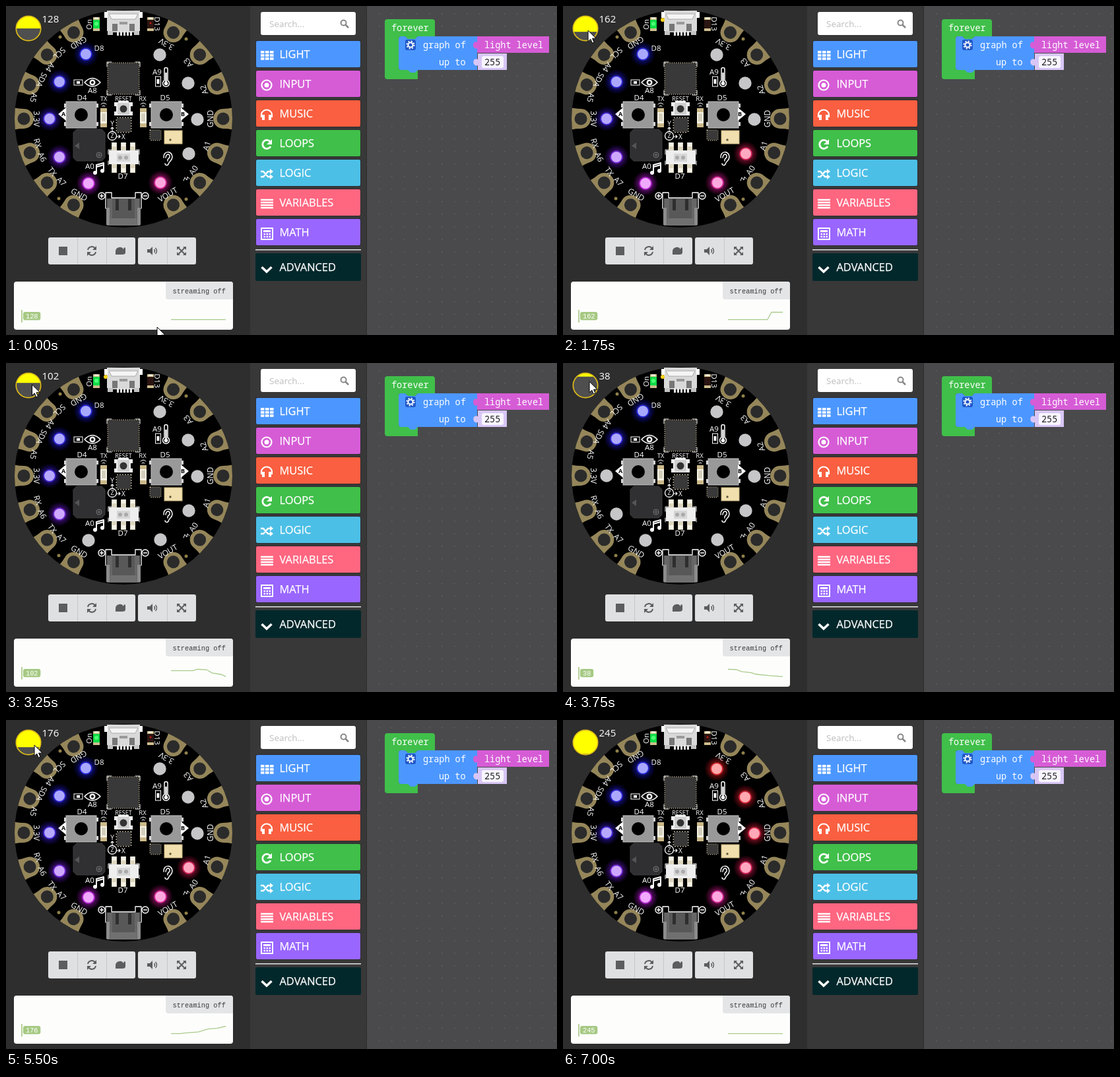
Recreate the animation shown at these times as an HTML page. Size 835 by 499 pixels, loop 7250 ms.

```html
<!DOCTYPE html>
<html lang="en">
<head>
<meta charset="utf-8">
<title>Light level graph</title>
<style>
html, body { margin: 0; width: 100%; height: 100%; overflow: hidden; background: #2e2e2e; }
svg { display: block; font-family: "Open Sans", "Noto Sans", sans-serif; }
.board text { fill: #fff; font-size: 11.5px; text-anchor: middle; }
.line { fill: none; stroke: #fff; stroke-width: 1.5; stroke-linecap: round; stroke-linejoin: round; }
.menu text { fill: #fff; stroke: #fff; stroke-width: .25px; font-size: 16.4px; }
.code { font: 13.5px "Noto Sans Mono", "DejaVu Sans Mono", monospace; fill: #fff; }
.mono { font: 10.3px "Liberation Mono", monospace; }
</style>
</head>
<body>
<svg id="stage" width="835" height="499" viewBox="0 0 835 499">
  <defs>
    <clipPath id="disc"><circle cx="178" cy="171" r="165"/></clipPath>
    <clipPath id="sun"><circle cx="34" cy="34" r="18.5"/></clipPath>
    <pattern id="dots" x="556" y="2" width="19" height="19" patternUnits="userSpaceOnUse">
      <rect x="9" y="9" width="1.4" height="1.4" fill="#666668"/>
    </pattern>
  </defs>
  <rect width="370" height="499" fill="#2e2e2e"/>
  <rect x="370" width="177" height="499" fill="#383839"/>
  <rect x="547" width="288" height="499" fill="#4a4a4c"/>
  <rect x="547" width="288" height="499" fill="url(#dots)"/>
  <path d="M546.5 0V499" stroke="#2c2c2c"/>

  <g id="board" class="board"></g>
  <g id="leds"></g>

  <circle cx="34" cy="34" r="18.5" fill="#4f4f4f"/>
  <rect id="level" x="15" y="15" width="38" height="0" fill="#ff0" clip-path="url(#sun)"/>
  <circle cx="34" cy="34" r="18.7" fill="none" stroke="#dfbd18" stroke-width="1.7"/>
  <text id="reading" x="54.5" y="25" fill="#fff" font-size="15"></text>

  <g id="tools"></g>

  <rect x="12" y="418" width="332" height="73" rx="4" fill="#fdfefc"/>
  <path d="M242 418H340a4 4 0 0 1 4 4V445H246a4 4 0 0 1-4-4Z" fill="#e4e5e7"/>
  <text class="mono" x="252.5" y="436" fill="#3a3a3a">streaming off</text>
  <path d="M24 461V480" stroke="#a3c67f" stroke-width="1.6"/>
  <rect id="tag" x="26" y="464" width="26" height="12.5" rx="3" fill="#a6c983"/>
  <text id="tagText" class="mono" x="30" y="473.5" fill="#fff"></text>
  <path id="plot" fill="none" stroke="#a9ca8b" stroke-width="1.3"/>

  <g id="menu" class="menu"></g>

  <g>
    <path d="M574 24a4 4 0 0 1 4-4H646a4 4 0 0 1 4 4V46H624l-4 4H609l-4-4H599a4 4 0 0 0-4 4V93a4 4 0 0 0 4 4H624V111H578a4 4 0 0 1-4-4Z" fill="#40bf4a"/>
    <path d="M595 50a4 4 0 0 1 4-4H605l4 4H620l4-4H714V97H624l-4 4H613l-4-4H599a4 4 0 0 1-4-4Z" fill="#4c97ff"/>
    <path d="M714 46H823V71H714V64c-8 3-8-13 0-9Z" fill="#d65cd6"/>
    <path d="M715 72H759V97H715V90c-9 3-9-13 0-9Z" fill="#d8c6f6"/>
    <rect x="721" y="76" width="33" height="18" rx="3" fill="#f8f5ff"/>
    <rect x="605" y="51" width="16" height="16" rx="3" fill="#1f57c8"/>
    <circle cx="613" cy="59" r="3.6" fill="none" stroke="#fff" stroke-width="2"/>
    <circle cx="613" cy="59" r="5.6" fill="none" stroke="#fff" stroke-width="1.8" stroke-dasharray="2.2 2.2"/>
    <g class="code">
      <text x="584" y="38">forever</text>
      <text x="632" y="64">graph of</text>
      <text x="656" y="90">up to</text>
      <text x="725" y="64">light level</text>
      <text x="725" y="90" style="fill:#222">255</text>
    </g>
  </g>
  <path id="cursor" d="M0 0V16.5L3.8 13 6.3 19 9 17.8 6.5 12H12Z" fill="#fff" stroke="#000"/>
</svg>
<script>
const $ = id => document.getElementById(id);
const rect = (x, y, w, h, fill, more = '') =>
  `<rect x="${x}" y="${y}" width="${w}" height="${h}" fill="${fill}" ${more}/>`;
const disc = (x, y, r, fill, more = '') =>
  `<circle cx="${x}" cy="${y}" r="${r}" fill="${fill}" ${more}/>`;
const path = (d, fill, more = '') => `<path d="${d}" fill="${fill}" ${more}/>`;
const line = (d, width = 1.5) => `<path class="line" d="${d}" style="stroke-width:${width}"/>`;
const label = (s, x, y, turn = 0, size = 11.5, fill = '#fff') =>
  `<text transform="translate(${x} ${y}) rotate(${turn})" y="${size * 0.36}" style="font-size:${size}px;fill:${fill}">${s}</text>`;
// Text on the rim stands with its feet outwards
const rim = (s, x, y) => label(s, x, y, Math.atan2(178 - x, y - 171) * 180 / Math.PI, 12);

function drawBoard() {
  let s = disc(178, 171, 165, '#000');
  for (let a = 30; a <= 150; a += 20) for (const side of [-a, a])
    s += `<g clip-path="url(#disc)"><g transform="translate(178 171) rotate(${side})">` +
      path('M-18 -170Q-15 -162 -15 -151A15 15 0 0 0 15 -151Q15 -162 18 -170Z', '#95865a') +
      disc(0, -151, 9.5, '#2b2b2b') + '</g></g>';
  for (const [x, y] of [[82, 47], [273, 50], [80, 292], [273, 293]]) s += disc(x, y, 2.5, '#8f8049');

  s += [['GND', 110, 56], ['SCL', 81, 72], ['A4', 67, 93], ['SDA', 54, 112], ['A5', 42, 139],
    ['3.3V', 46, 171], ['RX', 48, 208], ['A6', 55, 229], ['TX', 70, 251], ['A7', 84, 266],
    ['GND', 111, 286], ['VOUT', 245, 286], ['A0', 284, 249], ['A1', 304, 212], ['GND', 310, 171],
    ['A2', 300, 127], ['A3', 276, 86], ['3.3V', 243, 58]].map(v => rim(...v)).join('');
  s += [['D8', 141, 64], ['A8', 131, 128], ['D4', 115, 139], ['D5', 241, 139], ['A9', 229, 100],
    ['A0', 127, 243], ['D7', 177, 258], ['On', 126, 28, -90], ['D13', 229, 27, 90],
    ['TX', 148, 141, 0, 9.5], ['RX', 207, 141, 0, 9.5], ['RESET', 178, 141, 0, 9],
    ['Y', 161, 178, 0, 10], ['X', 178, 198, 0, 10], ['Z', 161, 197, 0, 9]].map(v => label(...v)).join('');
  s += line('M269 265l2-5 3 4 1-5 3 3', 1);

  // USB socket with its two lamps
  s += rect(153, 7, 50, 31, '#d9d9d9') + rect(149, 9, 5, 9, '#fff') + rect(202, 9, 5, 9, '#fff') +
    path('M156 12H200L196 20H160Z', '#f5f5f5', 'stroke="#aaa"') +
    path('M161 27h8v11h-8zM187 27h8v11h-8z', '#777') + rect(172, 24, 12, 4, '#9a9a9a') +
    path('M154 38H202V44H194V40H162V44H154Z', '#c4c4c4');
  for (let x = 168; x < 190; x += 5) s += rect(x, 38, 3, 7, '#e8e8e8');
  for (const [x, c] of [[132, '#0fdc45'], [214, '#2b1512']])
    s += rect(x, 17, 10, 21, '#cdbd8d') + rect(x, 21, 10, 13, c) + rect(x + 2, 17, 6, 3, '#f0ead2');
  s += disc(137, 27, 3, '#4dff75');
  s += disc(151, 21, 3, '#ffd21c', 'id="spark"') + disc(219, 26, 1.6, '#b81c14', 'id="pin13"');

  // Processor and small chips
  const chip = (x, y, w, h, pitch) => rect(x, y, w, h, '#363636',
    `stroke="#a39c84" stroke-width="3" stroke-dasharray="${pitch} ${pitch}"`) + rect(x, y, w, h, '#393939');
  s += chip(155, 87, 46, 46, 1.6) + chip(168, 170, 21, 21, 2) + chip(219, 189, 15, 14, 1.5);
  s += line('M153 92V85H160M196 85H203V92M203 128V135H196M160 135H153V128', 1);

  // Push buttons
  for (const x of [91, 220]) {
    for (const y of [148, 176]) s += rect(x - 3, y, 52, 6, '#d8d8d8');
    s += rect(x, 145, 46, 40, '#999', 'stroke="#c4c4c4"') + disc(x + 23, 165, 10, '#000');
  }
  s += path('M79 164L91 154V174Z', '#fff') + path('M277 164L265 154V174Z', '#fff') +
    '<g style="font-weight:700">' + label('A', 87, 164, 0, 9, '#000') + label('B', 268, 164, 0, 9, '#000') + '</g>';
  s += path('M164 146h6v-2h16v2h6v6h-3v8h3v6h-28v-6h3v-8h-3z', '#f2f2f2') +
    rect(169, 147, 18, 18, '#cfcfcf') + disc(178, 156, 5.5, '#333');

  // Serial lamps
  for (const x of [143, 203])
    s += rect(x, 155, 10, 29, '#cbb98a') + rect(x, 161, 10, 17, '#f6f2e4') + rect(x + 2, 163, 6, 12, '#d4cfbd') +
      line(`M${x + 1} 149q4 -4 8 0M${x + 3} 152q2 -2 4 0`, 1);
  s += disc(161, 197, 6.5, 'none', 'stroke="#fff" stroke-width="1.3"') +
    line('M161 190V184M159 186l2-2 2 2M168 198H173M171 196l2 2-2 2', 1.1);

  // Speaker, microphone, ear, note
  s += path('M107 187H145L150 192V230L145 235H107L102 230V192Z', '#303032', 'stroke="#3c3c3e"') +
    path('M104 212l7-5v10z', '#555') + disc(141, 226, 4, 'none', 'stroke="#777"') +
    path('M138.5 226H143.5M141 223.5V228.5', 'none', 'stroke="#777"');
  s += rect(240, 189, 27, 20, '#f1dfae', 'stroke="#c5b27c"') + disc(249, 203, 1.7, '#5f5738');
  s += line('M239 230C238 219 252 219 252 229C252 235 247 235 246 240C244 243 241 241 241 239M242 230C243 223 249 224 248 229C247 232 244 231 245 235');
  s += line('M137 252V241L148 238V249M137 244L148 241', 2) +
    disc(135, 253, 3, '#fff') + disc(146, 250, 3, '#fff');

  // Slide switch
  for (const x of [160, 174, 188])
    s += rect(x, 207, 8, 12, '#ddd6c0') + rect(x + 1, 207, 6, 6, '#f6f3e8') +
      rect(x, 240, 8, 13, '#ddd6c0') + rect(x + 1, 246, 6, 6, '#f6f3e8');
  s += rect(156, 219, 45, 21, '#eee') + rect(168, 224, 20, 12, '#d6d6d6') +
    disc(173, 230, 3, '#aaa') + disc(182, 230, 3, '#aaa');
  s += line('M155 225V218H160M197 218H202V225M155 235V241M202 235V241', 1);

  // Light and heat sensors
  s += rect(103, 112, 13, 8, 'none', 'stroke="#fff"') + rect(107, 114, 5, 4, '#fff');
  s += line('M119 116Q131 103 143 116Q131 128 119 116Z') + disc(131, 116, 4.5, '#fff') + disc(131, 116, 2, '#000');
  s += rect(226.5, 107, 8, 15, 'none', 'stroke="#fff"') + rect(228.5, 111, 4, 7, '#fff');
  s += line('M240 113V96a2.5 2.5 0 0 1 5 0V113a5 5 0 1 1-5 0Z') + line('M242.5 117V102', 2.5) +
    disc(242.5, 117.5, 2.8, '#fff');

  // Battery socket
  s += line('M151 307V283H160V291H196V283H205V307', 1.3) +
    rect(153, 292, 50, 41, '#666') + rect(161, 292, 34, 30, '#585858') +
    path('M166 293h5v17h-5zM185 293h5v17h-5z', '#2e2e2e') +
    path('M152 306h5v26h-5zM199 306h5v26h-5z', '#8c8c8c') + rect(158, 322, 40, 11, '#707070');
  for (const x of [145, 211])
    s += disc(x, 288, 5, 'none', 'stroke="#fff" stroke-width="1.4"') + line(`M${x - 2.5} 288h5`);
  s += line('M145 285.5v5');
  $('board').innerHTML = s;
}

const ledSpots = [[121, 73], [81, 115], [66, 171], [81, 229], [125, 269],
  [234, 268], [277, 224], [290, 172], [276, 117], [233, 74]];
const hues = [240, 243, 250, 266, 290, 322, 342, 350, 354, 358];

function drawLeds() {
  $('leds').innerHTML = ledSpots.map(([x, y], i) => {
    const h = hues[i];
    return `<radialGradient id="glow${i}"><stop offset=".4" stop-color="hsl(${h} 90% 55%)" stop-opacity=".5"/>` +
      `<stop offset="1" stop-color="hsl(${h} 90% 50%)" stop-opacity="0"/></radialGradient>` +
      disc(x, y, 9.7, '#c6c6c8') + `<g class="on">` + disc(x, y, 9.7, '#000') + disc(x, y, 19, `url(#glow${i})`) +
      disc(x, y, 8.8, `hsl(${h} 100% 83%)`, `stroke="hsl(${h} 75% 48%)" stroke-width="1.6"`) + '</g>';
  }).join('');
}

function drawTools() {
  const g = '#5c5d5f', st = `stroke="${g}" stroke-width="2"`;
  $('tools').innerHTML = rect(64, 351, 132, 41, '#dfe0e2', 'rx="3"') + rect(200, 351, 88, 41, '#dfe0e2', 'rx="3"') +
    path('M108.5 351V392M152.5 351V392M244.5 351V392', 'none', 'stroke="#c6c7c9"') +
    rect(80, 365, 13, 13, g) +
    path('M124 370a6 6 0 0 1 11-2M136 373a6 6 0 0 1-11 2', 'none', st) +
    path('M137 364v6h-6zM123 379v-6h6z', g) +
    path('M166 377v-4a6.5 6.5 0 0 1 12-4l1-3 2 1v7q0 3-5 3z', g) +
    path('M214 369h4l4-4v13l-4-4h-4z', g) +
    path('M224.5 369q2 2.5 0 5M226.5 367q4 4.5 0 9', 'none', `stroke="${g}" stroke-width="1.5"`) +
    path('M261 366.5l10 10M271 366.5l-10 10', 'none', st) +
    path('M259 365h5l-5 5zM273 365v5l-5-5zM259 378v-5l5 5zM273 378h-5l5-5z', g);
}

function drawMenu() {
  const w = (d, k = 2) => path(d, 'none', `stroke="#fff" stroke-width="${k}"`);
  let grid = '';
  for (let i = 0; i < 9; i++) grid += rect(386 + i % 3 * 7, 68 + (i / 3 | 0) * 5, 5.5, 3.8, '#fff');
  // Icons are drawn around their own centre
  const rows = [
    ['LIGHT', '#4c97ff', ''],
    ['INPUT', '#d65cd6', disc(0, 0, 7.5, 'none', 'stroke="#fff" stroke-width="2.2"') + disc(0, 0, 3.5, '#fff')],
    ['MUSIC', '#f95f40', w('M-8 4V0a8 7.5 0 0 1 16 0V4', 2.2) + rect(-7, 0, 4, 8, '#fff') + rect(3, 0, 4, 8, '#fff')],
    ['LOOPS', '#40bf4a', w('M5.5 -4A6.5 6.5 0 1 0 6 3', 2.8) + path('M8 -8V0H0Z', '#fff')],
    ['LOGIC', '#4cbfe6', w('M-9 -4H-5L2 4H6M-9 4H-5L2 -4H6', 2.4) + path('M5 -8l5 4-5 4zM5 0l5 4-5 4z', '#fff')],
    ['VARIABLES', '#ff6680', w('M-9 -6H10M-9 -2H10M-9 2H10M-9 6H10', 2.4)],
    ['MATH', '#9966ff', rect(-8, -8, 17, 17, 'none', 'stroke="#fff" stroke-width="2"') +
      rect(-5, -5, 11, 3, '#fff') + path('M-4.5 1H6M-4.5 5H6', 'none', 'stroke="#fff" stroke-width="2.5" stroke-dasharray="2.5 1.5"')]
  ];
  let s = rect(386, 9, 144, 35, '#fff', 'rx="3"') +
    '<text x="399" y="32" style="font-size:13.5px;fill:#bdbdbf;stroke:none">Search...</text>' +
    disc(511.5, 25.5, 4, 'none', 'stroke="#888" stroke-width="2"') + path('M514.5 28.5L519 33', 'none', 'stroke="#888" stroke-width="2.5"');
  rows.forEach(([name, fill, icon], i) => {
    const y = 53 + 45 * i;
    s += rect(378.5, y - .5, 159, 41, '#242426', 'rx="2"') + rect(379, y, 158, 40, fill, 'rx="2"') +
      `<g transform="translate(395 ${y + 22})">${icon}</g><text x="414.5" y="${y + 26}">${name}</text>`;
  });
  s += grid + rect(378, 369, 160, 1.5, '#e4e4e4') + rect(378, 375, 160, 42, '#03282b', 'rx="2"') +
    w('M387.5 396L395 403L402.5 396', 3.6) + '<text x="414.5" y="402">ADVANCED</text>';
  $('menu').innerHTML = s;
}

// Light level over time: [ms, level]
const levels = [[0, 128], [1470, 128], [1545, 162], [1930, 162], [1975, 176], [2170, 176], [2230, 195],
  [2650, 195], [2740, 218], [2900, 210], [3000, 160], [3170, 135], [3260, 98], [3500, 62], [3750, 38],
  [3967, 38], [4040, 12], [4665, 12], [4740, 24], [5000, 50], [5180, 115], [5340, 130], [5500, 176],
  [5750, 215], [5990, 245]];
const moves = [[0, 229, 487], [250, 225, 470], [500, 185, 350], [750, 110, 180], [1000, 50, 70], [1250, 33, 35],
  [1750, 38, 37], [2750, 39, 41], [3750, 40, 28], [4750, 40, 27], [5500, 43, 38], [6250, 43, 43],
  [6500, 60, 58], [6750, 371, 150]];

function at(list, t, col = 1) {
  const i = list.findIndex(p => p[0] > t);
  if (i < 0) return list[list.length - 1][col];
  if (i === 0) return list[0][col];
  const a = list[i - 1], b = list[i];
  return a[col] + (b[col] - a[col]) * (t - a[0]) / (b[0] - a[0]);
}

function plot(t) {
  const from = t - 1000;
  const pts = [[from, at(levels, from)], ...levels.filter(p => p[0] > from && p[0] < t), [t, at(levels, t)]];
  const all = pts.map(p => p[1]), lo = Math.min(...all), span = Math.max(...all) - lo;
  return 'M' + pts.map(([s, v]) =>
    (250 + (s - from) * .083).toFixed(1) + ' ' + (475.7 - (span ? 11.2 * (v - lo) / span : 0)).toFixed(1)).join('L');
}

const LOOP = 7250, STEP = 250;
let shown = -1;

function show(step) {
  const t = step * STEP, level = Math.round(at(levels, t)), text = String(level);
  $('reading').textContent = $('tagText').textContent = text;
  $('tag').setAttribute('width', 8 + 6.1 * text.length);
  $('level').setAttribute('height', 38 * level / 255);
  const lit = Math.ceil(level * 10 / 255);
  document.querySelectorAll('.on').forEach((led, i) => led.style.display = i < lit ? '' : 'none');
  $('plot').setAttribute('d', plot(t));
  const blink = step % 6 >= 1 && step % 6 <= 3;
  $('spark').style.display = blink ? '' : 'none';
  $('pin13').style.display = blink ? 'none' : '';
  // While dragging, the pointer height sets the level
  const drag = t >= 1250 && t <= 6250;
  const y = drag ? 25.4 + level * .0725 : at(moves, t, 2);
  $('cursor').setAttribute('transform', `translate(${at(moves, t)} ${y})`);
  $('cursor').style.display = t < 7000 ? '' : 'none';
}

function tick() {
  const step = Math.floor((performance.now() - start) % LOOP / STEP);
  if (step !== shown) show(shown = step);
  requestAnimationFrame(tick);
}

drawBoard();
drawLeds();
drawTools();
drawMenu();
const start = performance.now();
tick();
</script>
</body>
</html>
```
